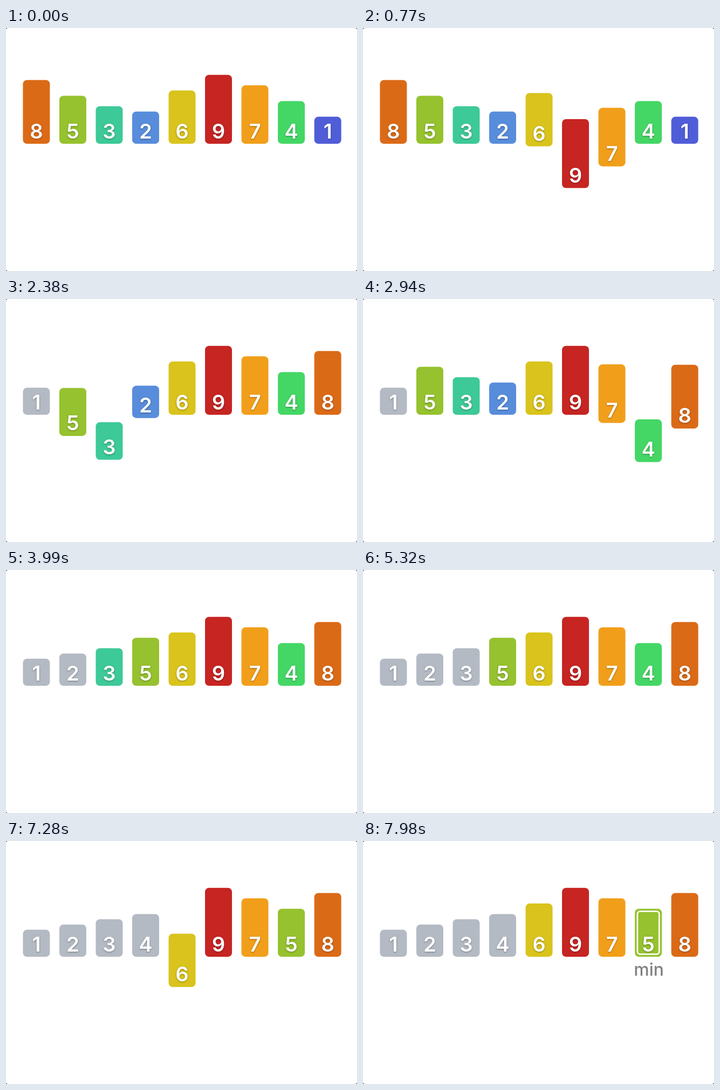
Animation of 612x424 px, one loop 8 s. Source, as an HTML page with a canvas:

```html
<!DOCTYPE html>
<html lang="en">
<head>
<meta charset="utf-8">
<title>Selection sort</title>
<style>
  html, body { margin: 0; width: 100%; height: 100%; overflow: hidden; background: #000; }
  canvas { display: block; }
</style>
</head>
<body>
<canvas id="stage" width="612" height="424"></canvas>
<script>
const ctx = document.getElementById('stage').getContext('2d');
const LOOP = 8000;
const VALUES = [8, 5, 3, 2, 6, 9, 7, 4, 1];
const COLORS = {
  1: [80, 93, 216], 2: [88, 141, 219], 3: [61, 201, 152],
  4: [68, 215, 101], 5: [150, 194, 47], 6: [217, 195, 28],
  7: [241, 159, 27], 8: [219, 106, 23], 9: [198, 37, 34]
};
const DONE = [180, 186, 195];

// Start of the wave and of the swap in each pass, in ms
const PASSES = [[60, 1520], [2143, 3410], [3993, 5180], [5495, 6580], [7190, Infinity]];
const STAGGER = 106, HALF_DIP = 155, DIP = 83;
const SWAP = 350, FADE = 90, ARC = 31;
const LEFT = 29.5, STEP = 63.5, WIDTH = 47, BOTTOM = 202;

const clamp = v => Math.min(1, Math.max(0, v));
const ease = u => (1 - Math.cos(Math.PI * u)) / 2;
const slotX = i => LEFT + STEP * i;

function roundRect(x, y, w, h, r) {
  ctx.beginPath();
  ctx.roundRect(x, y, w, h, r);
}

function sceneAt(t) {
  const order = [...VALUES];
  const bars = {};
  let label = null;
  VALUES.forEach(v => bars[v] = { value: v, dy: 0, gray: 0, mark: 0, layer: 1 });
  const place = () => order.forEach((v, i) => bars[v].x = slotX(i));
  place();

  PASSES.forEach(([scan, swap], first) => {
    if (t < scan) return;
    const last = order.length - 1;
    for (let i = first; i <= last; i++) {
      const u = (t - scan - (i - first) * STAGGER) / HALF_DIP;
      bars[order[i]].dy = DIP * ease(clamp(u / 2) * 2);
    }
    if (t < scan + (last - first) * STAGGER + 2 * HALF_DIP) return;

    const min = Math.min(...order.slice(first));
    const at = order.indexOf(min);
    const low = bars[min], other = bars[order[first]];
    low.mark = 1;
    if (t <= swap) {
      label = at;
      return;
    }
    const travel = at === first ? 0 : SWAP;
    low.gray = clamp((t - swap - travel) / FADE);
    low.mark = 1 - low.gray;
    if (t < swap + travel) {
      const p = ease((t - swap) / travel);
      const shift = (slotX(at) - slotX(first)) * p;
      const lift = ARC * Math.sin(Math.PI * p);
      low.x -= shift;
      other.x += shift;
      low.dy = -lift;
      other.dy = lift;
      low.layer = 2;
      other.layer = 0;
    } else {
      [order[first], order[at]] = [min, order[first]];
      place();
    }
  });
  return { bars: Object.values(bars).sort((a, b) => a.layer - b.layer), label };
}

function drawBar({ value, x, dy, gray, mark }) {
  const h = 38 + 9.15 * value;
  const y = BOTTOM - h + dy;
  const rgb = COLORS[value].map((c, i) => Math.round(c + (DONE[i] - c) * gray));
  ctx.fillStyle = `rgb(${rgb})`;
  roundRect(x, y, WIDTH, h, 7);
  ctx.fill();
  if (mark) {
    ctx.strokeStyle = `rgba(255,255,255,${mark})`;
    ctx.lineWidth = 2.5;
    roundRect(x + 4.5, y + 4.5, WIDTH - 9, h - 9, 4.5);
    ctx.stroke();
  }
  ctx.save();
  ctx.shadowColor = 'rgba(0,0,0,.35)';
  ctx.shadowBlur = 3;
  ctx.shadowOffsetY = 1;
  ctx.fillStyle = '#fff';
  ctx.font = '600 36px Inter, sans-serif';
  ctx.fillText(value, x + WIDTH / 2, BOTTOM - 9.5 + dy);
  ctx.restore();
}

function draw(now) {
  const { bars, label } = sceneAt(now % LOOP);
  ctx.fillStyle = '#000';
  ctx.fillRect(0, 0, 612, 424);
  ctx.fillStyle = '#fff';
  roundRect(0, 0, 612, 424, 3);
  ctx.fill();
  ctx.textAlign = 'center';
  bars.forEach(drawBar);
  if (label !== null) {
    ctx.fillStyle = '#808083';
    ctx.font = '500 30px Inter, sans-serif';
    ctx.fillText('min', slotX(label) + WIDTH / 2 + 1, 235);
  }
  requestAnimationFrame(draw);
}
requestAnimationFrame(draw);
</script>
</body>
</html>
```
